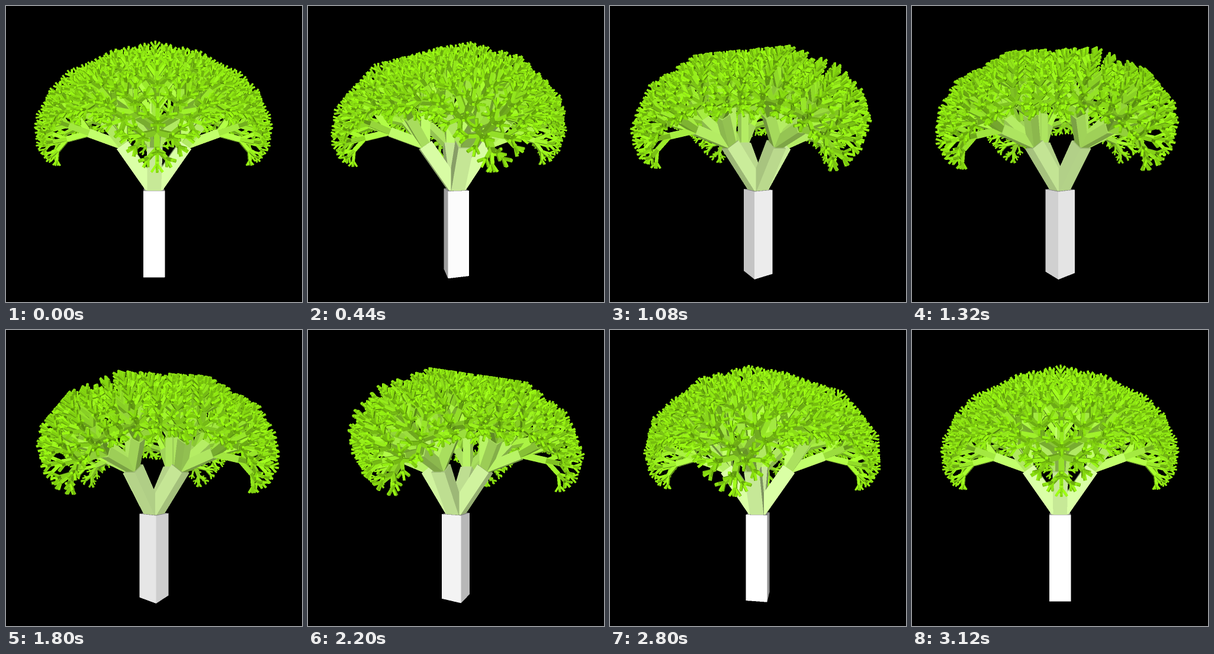
Write an HTML page with a canvas that moves like this. It is 500 by 500 pixels and loops after 3160 ms.

```html
<!DOCTYPE html>
<html lang="en">
<head>
<meta charset="utf-8">
<title>Fractal tree</title>
<style>
html, body { margin: 0; width: 100%; height: 100%; overflow: hidden; background: #000; }
canvas { display: block; width: 500px; height: 500px; }
</style>
</head>
<body>
<canvas id="stage" width="500" height="500"></canvas>
<script>
const SIZE = 500, SS = 2, W = SIZE * SS;
const FOCAL = SIZE / 2 / Math.tan(Math.PI / 6);
const LOOP = 3160, STEP = 40, TURN = 0.02;
const TRUNK = 140, RATIO = 0.65, DEPTH = 6, TILT = 35 * Math.PI / 180;
const COS = Math.cos(TILT), SIN = Math.sin(TILT);

const ctx = document.getElementById('stage').getContext('2d');
const image = ctx.createImageData(SIZE, SIZE);
const out = new Uint32Array(image.data.buffer);
const color = new Uint32Array(W * W);
const depth = new Float32Array(W * W);
const faces = [];

// a * s + b * t
const mix = (a, s, b, t) => a.map((v, i) => v * s + b[i] * t);
const neg = a => a.map(v => -v);

function addBox(base, u, up, w, len, tint) {
  const h = len / 8;
  const mid = mix(base, 1, up, len / 2);
  const axes = [[u, h], [up, len / 2], [w, h]];
  axes.forEach(([n, r], i) => {
    const [a, ra] = axes[(i + 1) % 3], [b, rb] = axes[(i + 2) % 3];
    for (const side of [1, -1]) {
      const c = mix(mid, 1, n, side * r);
      const pts = [[1, 1], [1, -1], [-1, -1], [-1, 1]].map(
        ([p, q]) => mix(mix(c, 1, a, p * ra), 1, b, q * rb));
      faces.push({ n: n.map(v => v * side), pts, tint });
    }
  });
}

function grow(base, u, up, w, len, level) {
  const k = len / TRUNK;
  addBox(base, u, up, w, len, [150 + 105 * k, 255, 255 * k]);
  if (level === DEPTH) return;
  const tip = mix(base, 1, up, len);
  for (const [s, t] of [[u, w], [neg(u), w], [w, u], [neg(w), u]]) {
    grow(tip, mix(s, COS, up, -SIN), mix(up, COS, s, SIN), t, len * RATIO, level + 1);
  }
}

const px = new Float64Array(4), py = new Float64Array(4);

function drawFace({ n, pts, tint }, c, s) {
  const nx = n[0] * c + n[2] * s, ny = n[1], nz = n[2] * c - n[0] * s;
  let top = Infinity, bottom = -Infinity, dist = 0;
  for (let i = 0; i < 4; i++) {
    const p = pts[i];
    const x = p[0] * c + p[2] * s, z = p[2] * c - p[0] * s - FOCAL;
    if (i === 0) {
      dist = nx * x + ny * p[1] + nz * z;
      if (dist >= 0) return;
    }
    const scale = -FOCAL / z * SS;
    px[i] = x * scale + W / 2;
    py[i] = p[1] * scale + W / 2;
    top = Math.min(top, py[i]);
    bottom = Math.max(bottom, py[i]);
  }

  const light = Math.min(1, (128 + 128 * Math.max(0, nz)) / 255);
  const rgb = (255 << 24 | Math.round(tint[2] * light) << 16 |
    Math.round(tint[1] * light) << 8 | Math.round(tint[0] * light)) >>> 0;

  // inverse depth is linear across the screen
  const kx = nx / (FOCAL * SS * dist), ky = ny / (FOCAL * SS * dist), k0 = -nz / dist;
  const y0 = Math.max(0, Math.ceil(top - 0.5));
  const y1 = Math.min(W - 1, Math.ceil(bottom - 0.5) - 1);
  for (let y = y0; y <= y1; y++) {
    const sy = y + 0.5;
    let left = Infinity, right = -Infinity;
    for (let i = 0; i < 4; i++) {
      const j = (i + 1) & 3;
      if ((py[i] <= sy) === (py[j] <= sy)) continue;
      const x = px[i] + (px[j] - px[i]) * (sy - py[i]) / (py[j] - py[i]);
      if (x < left) left = x;
      if (x > right) right = x;
    }
    const x0 = Math.max(0, Math.ceil(left - 0.5));
    const x1 = Math.min(W - 1, Math.ceil(right - 0.5) - 1);
    let inv = k0 + kx * (x0 + 0.5 - W / 2) + ky * (sy - W / 2);
    for (let x = x0, at = y * W + x0; x <= x1; x++, at++, inv += kx) {
      if (inv > depth[at]) {
        depth[at] = inv;
        color[at] = rgb;
      }
    }
  }
}

function shrink() {
  for (let y = 0, at = 0; y < SIZE; y++) {
    for (let x = 0; x < SIZE; x++, at++) {
      const i = y * SS * W + x * SS;
      const a = color[i], b = color[i + 1], d = color[i + W], e = color[i + W + 1];
      const avg = bit => ((a >> bit & 255) + (b >> bit & 255) +
        (d >> bit & 255) + (e >> bit & 255) + 2) >> 2;
      out[at] = a === b && a === d && a === e
        ? a
        : 255 << 24 | avg(16) << 16 | avg(8) << 8 | avg(0);
    }
  }
}

function render(angle) {
  color.fill(0xff000000);
  depth.fill(0);
  const c = Math.cos(angle), s = Math.sin(angle);
  for (const face of faces) drawFace(face, c, s);
  shrink();
  ctx.putImageData(image, 0, 0);
}

grow([0, 200, 0], [1, 0, 0], [0, -1, 0], [0, 0, 1], TRUNK, 0);

const start = performance.now();
let shown = -1;

function tick(now) {
  const t = Math.max(0, now - start) % LOOP;
  const index = Math.floor(t / STEP + 1e-6);
  if (index !== shown) {
    shown = index;
    render((index + 1) * TURN);
  }
  requestAnimationFrame(tick);
}
tick(start);
</script>
</body>
</html>
```
